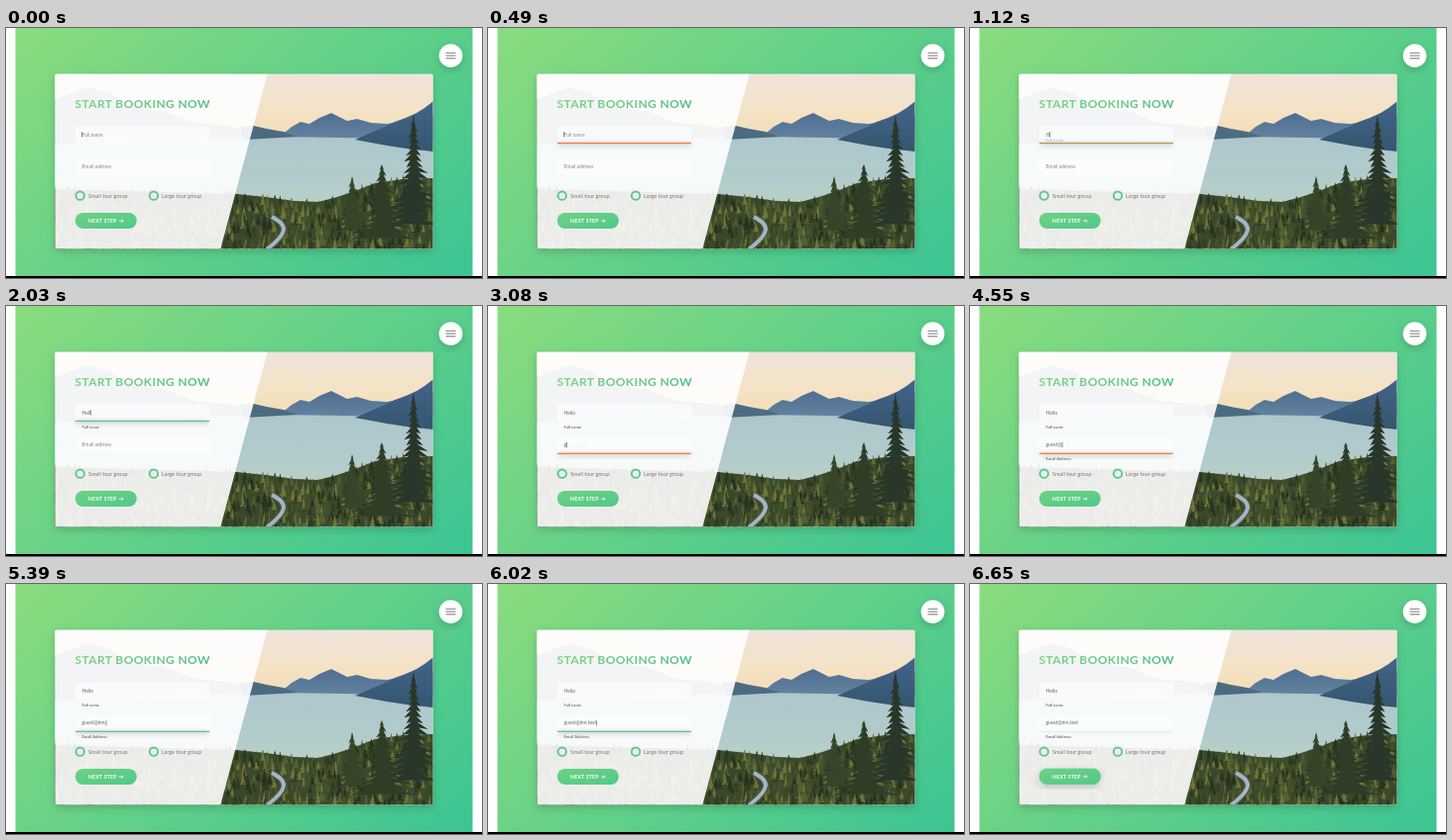
These frames come from a looping animation (480 px wide and 253 px high, 6.72 s). An HTML page:

```html
<!DOCTYPE html>
<html lang="en">
<head>
<meta charset="utf-8">
<title>Booking form</title>
<style>
  html, body { margin: 0; width: 100%; height: 100%; overflow: hidden; background: #fff; }
  svg { display: block; width: 100%; height: 100%; }
  text { font-family: Lato, sans-serif; font-size: 5px; fill: #777; white-space: pre; }
  .title { font-size: 12px; font-weight: 700; letter-spacing: .39px; fill: url(#accent); }
  .option { font-size: 5.5px; }
  .label { font-size: 4.1px; font-weight: 700; }
  .action { font-size: 5.2px; font-weight: 700; letter-spacing: .2px; fill: #fff; }
  .field { fill: #fff; fill-opacity: .55; }
  .radio { fill: none; stroke: #5cc78d; stroke-width: 1.9; }
  .glow { fill: #000; fill-opacity: .14; filter: url(#soft); }
  .caret { fill: #555; }

  .focus, .label, .button, .lift { animation: 6720ms infinite; }
  .name .focus { animation-name: name-focus; }
  .mail .focus { animation-name: mail-focus; }
  .name .label { animation-name: name-label; }
  .mail .label { animation-name: mail-label; }
  .button { animation-name: press; }
  .lift { animation-name: lift; }

  @keyframes name-focus {
    0% { opacity: 0; fill: #f47735; }
    4.5% { opacity: 1; }
    15.6% { opacity: 1; fill: #f47735; }
    20.1% { fill: #55c57a; }
    38.7% { opacity: 1; }
    43.2%, 100% { opacity: 0; fill: #55c57a; }
  }
  @keyframes mail-focus {
    0%, 38.7% { opacity: 0; fill: #f47735; }
    43.2% { opacity: 1; }
    71.4% { fill: #f47735; }
    75.9% { fill: #55c57a; }
    96.4% { opacity: 1; }
    100% { opacity: .1; fill: #55c57a; }
  }
  @keyframes name-label {
    0%, 15.6% { opacity: 0; transform: translateY(-13.5px); }
    20.1%, 100% { opacity: 1; transform: none; }
  }
  @keyframes mail-label {
    0%, 45.5% { opacity: 0; transform: translateY(-13.5px); }
    50%, 100% { opacity: 1; transform: none; }
  }
  @keyframes press {
    0%, 92% { transform: none; }
    95%, 96.4% { transform: translateY(-.8px); }
    99%, 100% { transform: translateY(-.3px); }
  }
  @keyframes lift {
    0%, 92% { opacity: 0; }
    95%, 100% { opacity: 1; }
  }
</style>
</head>
<body>
<svg viewBox="0 0 480 253" preserveAspectRatio="none">
  <defs>
    <linearGradient id="page" gradientUnits="userSpaceOnUse" x1="75" y1="-60" x2="405" y2="312">
      <stop stop-color="#8adc7e"/><stop offset="1" stop-color="#3bc493"/>
    </linearGradient>
    <linearGradient id="accent">
      <stop stop-color="#80d583"/><stop offset="1" stop-color="#55c08c"/>
    </linearGradient>
    <linearGradient id="pill" x2="1" y2="1">
      <stop stop-color="#6dd282"/><stop offset="1" stop-color="#52c88b"/>
    </linearGradient>
    <linearGradient id="sky" x2="0" y2="1">
      <stop stop-color="#efe4dc"/><stop offset=".65" stop-color="#f4e2c3"/><stop offset="1" stop-color="#f0dcb8"/>
    </linearGradient>
    <linearGradient id="lake" x2="0" y2="1">
      <stop stop-color="#aec6cd"/><stop offset=".3" stop-color="#b0cacc"/><stop offset=".6" stop-color="#b9d0c8"/>
    </linearGradient>
    <linearGradient id="ridge" x2="0" y2="1">
      <stop stop-color="#4f6d92"/><stop offset="1" stop-color="#6484a0"/>
    </linearGradient>
    <linearGradient id="slope" x2="0" y2="1">
      <stop stop-color="#44648a"/><stop offset="1" stop-color="#34566f"/>
    </linearGradient>
    <filter id="soft" x="-20%" y="-200%" width="140%" height="500%"><feGaussianBlur stdDeviation="2"/></filter>
    <filter id="drop" x="-30%" y="-30%" width="160%" height="160%">
      <feDropShadow dx="0" dy="3" stdDeviation="4" flood-opacity=".18"/>
    </filter>
    <clipPath id="card"><rect x="49.600" y="46.800" width="380.800" height="176.400" rx="1"/></clipPath>
  </defs>

  <rect x="9.500" width="461" height="253" fill="url(#page)"/>
  <rect x="49.600" y="46.800" width="380.800" height="176.400" rx="1" fill="#fff" filter="url(#drop)"/>

  <g clip-path="url(#card)">
    <rect x="49" y="46" width="382" height="64" fill="url(#sky)"/>
    <rect x="49" y="109" width="382" height="115" fill="url(#lake)"/>
    <path fill="#8494a2" d="M49 72L82 60 104 66 128 80 160 84 190 96 226 99 250 106 250 110 49 118Z"/>
    <path fill="url(#ridge)" d="M276 110L288 100 297 95 306 97 316 91 328 86 336 90 344 94 354 92 368 96 384 97 400 94 431 88V113L340 111Z"/>
    <path fill="#4d6b80" d="M236 100L250 99 263 102 280 105 294 110 240 113Z"/>
    <path fill="url(#slope)" d="M352 113L368 106 382 100 392 95 403 91 414 86 422 81 431 74V125L404 122 384 119Z"/>
    <g id="forest"></g>
    <path fill="#fff" fill-opacity=".9" d="M49 46H263.700L216.200 224H49Z"/>
  </g>

  <g fill="#fff">
    <circle cx="448.500" cy="28" r="11.800" filter="url(#drop)"/>
    <path stroke="#777" stroke-width="1" d="M443.500 25.200h10M443.500 28h10M443.500 30.800h10"/>
  </g>

  <text class="title" x="69.500" y="81.200">START BOOKING NOW</text>

  <g class="name">
    <rect class="field" x="70" y="99.500" width="135" height="17"/>
    <g class="focus">
      <rect class="glow" x="71" y="115.500" width="133" height="4"/>
      <rect x="70" y="115.900" width="135" height="1.200"/>
    </g>
    <text class="label" x="76.500" y="123.500">Full name</text>
    <text class="value" x="76.500" y="109.500"></text>
    <rect class="caret" y="105" width=".6" height="5.600"/>
  </g>
  <g class="mail">
    <rect class="field" x="70" y="132.300" width="135" height="17"/>
    <g class="focus">
      <rect class="glow" x="71" y="148.300" width="133" height="4"/>
      <rect x="70" y="148.700" width="135" height="1.200"/>
    </g>
    <text class="label" x="76.500" y="156.300">Email Address</text>
    <text class="value" x="76.500" y="142.300"></text>
    <rect class="caret" y="137.800" width=".6" height="5.600"/>
  </g>

  <circle class="radio" cx="74.700" cy="169.700" r="4.200"/>
  <text class="option" x="83" y="171.600">Small tour group</text>
  <circle class="radio" cx="149" cy="169.700" r="4.200"/>
  <text class="option" x="157" y="171.600">Large tour group</text>

  <g class="button">
    <rect class="lift" x="69.800" y="187" width="62" height="16" rx="8" fill="#52c88b" filter="url(#drop)"/>
    <rect x="69.800" y="187" width="62" height="16" rx="8" fill="url(#pill)"/>
    <text class="action" x="83" y="197">NEXT STEP</text>
    <path d="M114 195.200h4M116.600 193.800L118.200 195.200 116.600 196.600" fill="none" stroke="#fff" stroke-width=".8"/>
  </g>

  <rect y="251" width="480" height="2" fill="#000"/>
</svg>

<script>
  const LOOP = 6720;
  let seed = 11;
  const rand = () => (seed = seed * 16807 % 2147483647) / 2147483647;
  const pick = list => list[Math.floor(rand() * list.length)];

  // Conifer with jagged tiers; (x, y) is the tip.
  function conifer(x, y, h, w, fill, tiers = 5) {
    let left = '', right = '';
    const reach = i => w * i / tiers * (.6 + rand() * .6);
    const at = (px, py) => `L${px.toFixed(1)} ${py.toFixed(1)}`;
    for (let i = 1; i <= tiers; i++) {
      const a = reach(i), b = reach(i);
      const base = y + h * i / tiers;
      const notch = base - h / tiers * .25;
      right += at(x + a, base) + at(x + a * .35, notch);
      left = at(x - b * .35, notch) + at(x - b, base) + left;
    }
    return `<path fill="${fill}" d="M${x.toFixed(1)} ${y.toFixed(1)}${right}${left}Z"/>`;
  }

  const skyline = [[49, 160], [232, 165], [262, 168], [290, 172], [315, 173], [334, 168], [352, 162], [372, 154], [400, 150], [431, 149]];
  function ridgeAt(x) {
    const i = Math.max(1, skyline.findIndex(p => p[0] >= x));
    const [a, b] = [skyline[i - 1], skyline[i]];
    return a[1] + (b[1] - a[1]) * (x - a[0]) / (b[0] - a[0]);
  }

  function forest() {
    const tones = ['#2f3a22', '#45522c', '#566133', '#70763b', '#39472a', '#26311f'];
    const ground = skyline.map(([x, y]) => `${x} ${y + 3}`).join('L');
    let out = `<path fill="#3b4a2a" d="M${ground}L431 224H49Z"/>`;
    for (let row = 0; row < 9; row++) {
      for (let x = 50; x < 430; x += 4 + rand() * 4) {
        const top = ridgeAt(x);
        const y = top + (223 - top) * row / 9 + rand() * 5 - 2;
        out += conifer(x, y, 8 + rand() * 8, 2.5 + rand() * 2.5, pick(tones), 4);
      }
    }
    const road = 'M263 224C271 218 279 211 280 204C280 198 275 195 268 191';
    out += `<path d="${road}" fill="none" stroke="#47543c" stroke-width="7"/>`;
    out += `<path d="${road}" fill="none" stroke="#a3b6c4" stroke-width="4"/>`;
    out += conifer(349, 150, 56, 19, '#36452a', 10);
    out += conifer(379, 138, 76, 32, '#2f3d27', 13);
    out += conifer(411, 88, 112, 25, '#29372a', 19);
    return out;
  }
  document.getElementById('forest').innerHTML = forest();

  // Each field holds its key times, plus the moments it gains and loses focus.
  const fields = [
    { row: '.name', hint: 'Full name', text: 'Hello', focus: 0, blur: 2600,
      keys: [1050, 1400, 1680, 1890, 2170] },
    { row: '.mail', hint: 'Email address', text: 'guest@inn.test', focus: 2600, blur: 6480,
      keys: [3060, 3400, 3620, 3830, 4050, 4400, 4800, 4960, 5120, 5300, 5500, 5680, 5840, 6000] }
  ];
  for (const f of fields) {
    f.value = document.querySelector(f.row + ' .value');
    f.caret = document.querySelector(f.row + ' .caret');
  }

  function type(f, t) {
    const count = f.keys.filter(k => k <= t).length;
    const text = count ? f.text.slice(0, count) : f.hint;
    if (f.value.textContent !== text) f.value.textContent = text;
    f.value.style.fill = count ? '#666' : '#888';
    const since = t - (count ? f.keys[count - 1] : f.focus);
    const shown = t >= f.focus && t < f.blur && since % 1000 < 500;
    f.caret.setAttribute('x', 76.4 + (count ? f.value.getComputedTextLength() + .2 : 0));
    f.caret.style.opacity = shown ? 1 : 0;
  }

  let start;
  function draw(now) {
    start ??= now;
    const t = (now - start) % LOOP;
    fields.forEach(f => type(f, t));
    requestAnimationFrame(draw);
  }
  requestAnimationFrame(draw);
</script>
</body>
</html>
```
